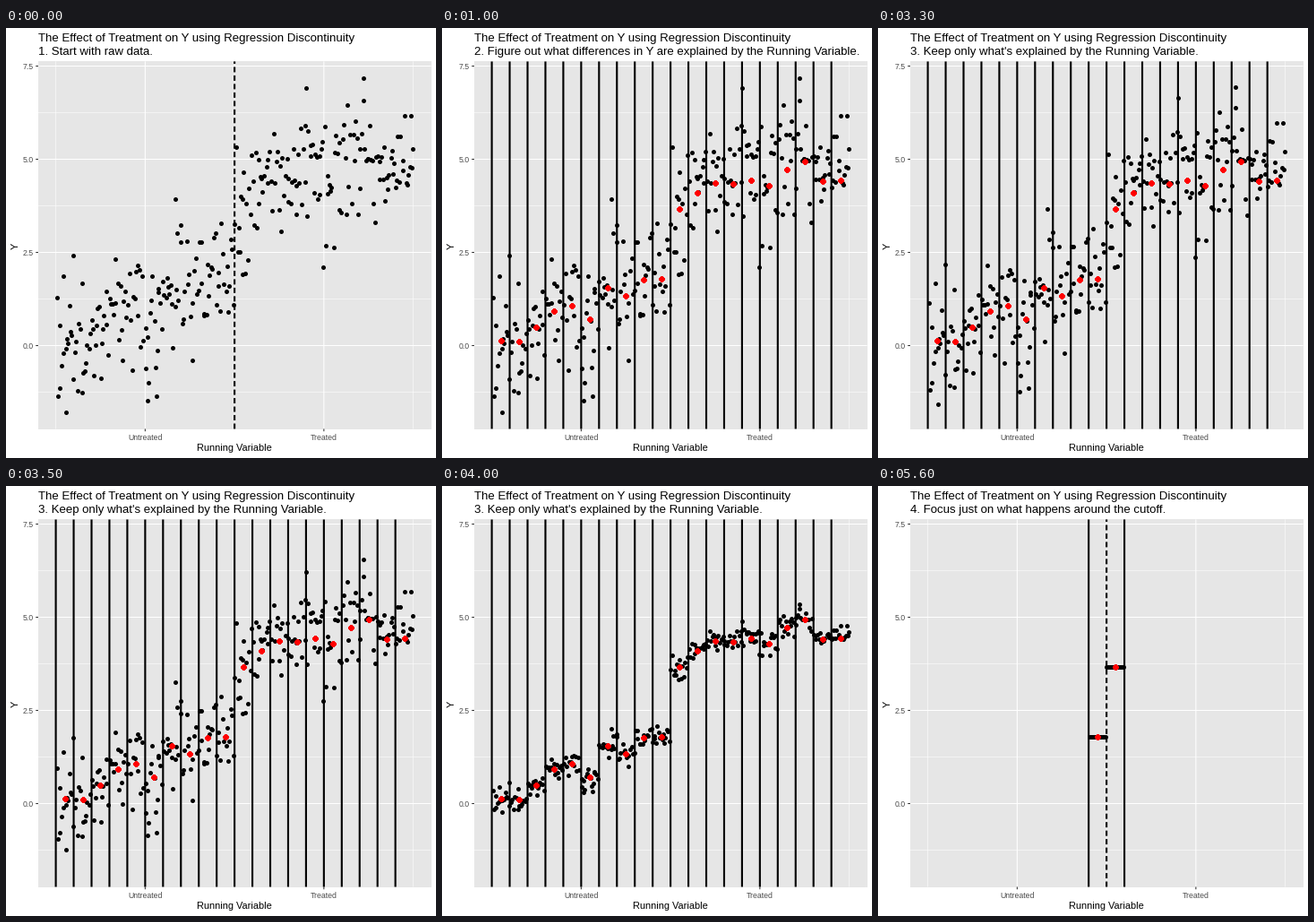
Recreate the animation shown at these times as a matplotlib script. Size 480 px wide and 480 px high, loop 8 s.

```python
import numpy as np
import matplotlib.pyplot as plt
from matplotlib.animation import FuncAnimation

SIZE, DPI = 480, 72
STEP_MS, FRAMES = 100, 80
BINS, X0, BIN_W = 20, 55.6, 19.95
LEFT, RIGHT, TOP, BOTTOM = 36, 474.5, 37.4, 447.5
SAMPLES = 275
GREY, TICK = "#4d4d4d", "#333333"

plt.rcParams["font.family"] = "Liberation Sans"


def x_px(k):
    """Left edge of bin k."""
    return X0 + BIN_W * k


def y_px(value):
    return 354.5 - 41.6 * value


# Average Y within each bin of the running variable
MEANS = y_px(np.array([0.13, 0.10, 0.50, 0.93, 1.08, 0.70, 1.55, 1.33, 1.77, 1.79,
                       3.67, 4.09, 4.37, 4.34, 4.43, 4.29, 4.72, 4.93, 4.41, 4.44]))

# The most extreme observations, in pixels
OUTLIERS = [(67, 429), (75, 254), (158, 416), (168, 411), (189, 191),
            (335, 67), (399, 56), (452, 98), (354, 267), (264, 275)]


def make_data():
    rng = np.random.default_rng(7)
    pos = (np.arange(SAMPLES) + rng.random(SAMPLES)) * BINS / SAMPLES
    noise = np.clip(rng.normal(0, 36, SAMPLES), -72, 72)
    sample = np.column_stack([x_px(pos), MEANS[pos.astype(int)] + noise])
    points = np.vstack([sample, OUTLIERS])
    return points, ((points[:, 0] - X0) // BIN_W).astype(int)


points, group = make_data()
centers = np.column_stack([x_px(np.arange(BINS) + 0.5), MEANS])

fig = plt.figure(figsize=(SIZE / DPI, SIZE / DPI), dpi=DPI, facecolor="white")
ax = fig.add_axes([0, 0, 1, 1])
ax.set(xlim=(0, SIZE), ylim=(SIZE, 0))
ax.axis("off")


def line(x, y, color, width, **kw):
    return ax.plot(x, y, color=color, lw=width, snap=False,
                   solid_capstyle="butt", dash_capstyle="butt", **kw)[0]


def v_line(x, color, width, **kw):
    return line([x, x], [BOTTOM, TOP], color, width, **kw)


def h_line(y, color, width, **kw):
    return line([LEFT, RIGHT], [y, y], color, width, **kw)


ax.add_patch(plt.Rectangle((LEFT, TOP), RIGHT - LEFT, BOTTOM - TOP,
                           fc="#e6e6e6", lw=0, zorder=0))
for value in np.arange(-1.25, 7, 2.5):
    h_line(y_px(value), "white", 0.53, zorder=1)
for k in (0, 10, 20):
    v_line(x_px(k), "white", 0.53, zorder=1)

for value in np.arange(0, 8, 2.5):
    y = y_px(value)
    h_line(y, "white", 1.07, zorder=1.1)
    line([LEFT - 2.75, LEFT], [y, y], TICK, 1.07)
    ax.text(31, y + 3.2, f"{value:.1f}", size=8.8, color=GREY, ha="right")
for k, label in ((5, "Untreated"), (15, "Treated")):
    x = x_px(k)
    v_line(x, "white", 1.07, zorder=1.1)
    line([x, x], [BOTTOM, BOTTOM + 2.75], TICK, 1.07)
    ax.text(x, 459.5, label, size=8.8, color=GREY, ha="center")

ax.text(255.2, 472, "Running Variable", size=11, ha="center")
ax.text(16, 243.5, "Y", size=11, rotation=90, ha="right", va="center")
ax.text(LEFT, 15, "The Effect of Treatment on Y using Regression Discontinuity", size=13.2)
subtitle = ax.text(LEFT, 30, "", size=13.2)

cutoff = v_line(x_px(10), "black", 2.13, ls=(0, (2.8, 1.65)), zorder=3)
edges = [v_line(x_px(k), "black", 2.13, zorder=3) for k in range(BINS)]
dots = ax.scatter(*points.T, s=5 ** 2, c="black", lw=0, zorder=4)
means = ax.scatter([], [], s=5.8 ** 2, c="red", lw=0, zorder=5)

STAGES = [
    (0, "1. Start with raw data."),
    (5, "2. Figure out what differences in Y are explained by the Running Variable."),
    (31, "3. Keep only what's explained by the Running Variable."),
    (56, "4. Focus just on what happens around the cutoff."),
]


def update(i):
    subtitle.set_text([text for start, text in STAGES if i >= start][-1])
    binned, focused = i >= 10, i >= 56

    t = np.clip((i - 30) / 14, 0, 1)
    ease = (1 - np.cos(np.pi * t)) / 2
    y = points[:, 1] + (MEANS[group] - points[:, 1]) * ease
    moved = np.column_stack([points[:, 0], y])
    near = (group == 9) | (group == 10)
    dots.set_offsets(moved[near] if focused else moved)

    # One mean mark per observation: stacking hardens the edges
    shown = centers[9:11] if focused else centers
    means.set_offsets(np.repeat(shown, SAMPLES // BINS, axis=0))
    means.set_visible(binned)

    cutoff.set_visible(not binned or focused)
    for k, edge in enumerate(edges):
        edge.set_visible(k in (9, 11) if focused else binned)
    return subtitle, dots, means, cutoff, *edges


anim = FuncAnimation(fig, update, frames=FRAMES, interval=STEP_MS,
                     init_func=lambda: update(0), repeat=True, repeat_delay=0)
plt.show()
```
